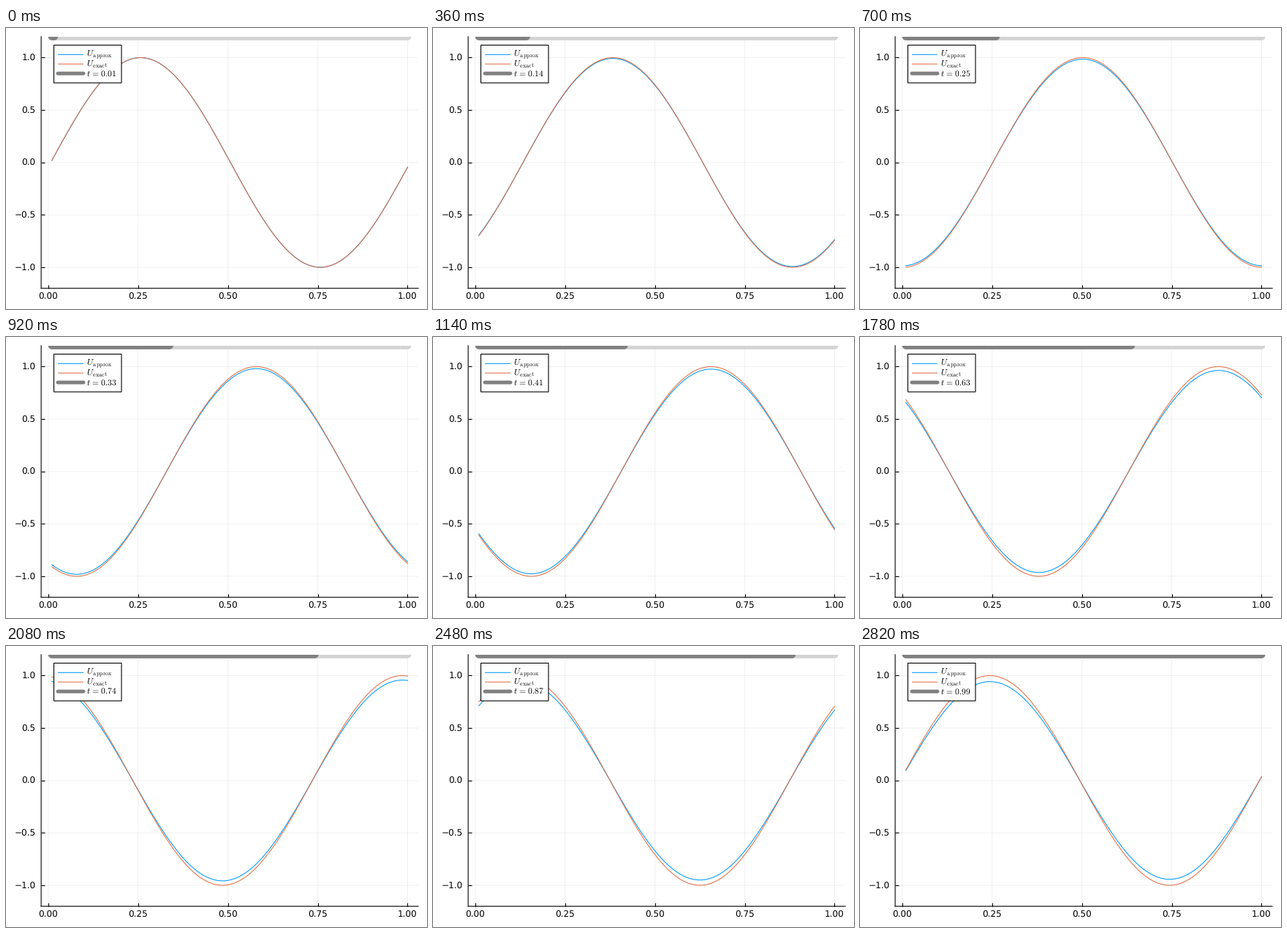
A matplotlib script for the animation above (2840 ms loop, 576x384 px).

```python
import numpy as np
import matplotlib as mpl
import matplotlib.pyplot as plt
from matplotlib.animation import FuncAnimation
from matplotlib.patches import Rectangle

W, H, DPI = 576, 384, 96
PX = 72 / DPI  # points per pixel
STEPS, INTERVAL = 142, 20

BLUE, ORANGE = "#009AFA", "#E26F46"
GRAY, LIGHT = "#808080", "#D3D3D3"

mpl.rcParams.update({
    "font.family": "DejaVu Sans",
    "font.size": 12 * PX,
    "mathtext.fontset": "cm",
    "text.hinting": "none",
    "path.snap": False,
})

# Linear advection on a periodic grid, first-order upwind scheme
dx, cfl = 0.01, 0.7
dt = cfl * dx
x = np.arange(1, 101) * dx
wave = np.exp(2j * np.pi * x)
gain = 1 - cfl + cfl * np.exp(-2j * np.pi * dx)
ticks = np.linspace(x[0], x[-1], STEPS + 1)  # clock and progress bar

LEFT, RIGHT, TOP, BOTTOM = 48.1, 564.1, 11.8, 355.7
fig = plt.figure(figsize=(W / DPI, H / DPI), dpi=DPI, facecolor="white")
ax = fig.add_axes([LEFT / W, 1 - BOTTOM / H,
                   (RIGHT - LEFT) / W, (BOTTOM - TOP) / H])
pad = 0.03 * (x[-1] - x[0])
ax.set(xlim=(x[0] - pad, x[-1] + pad), ylim=(-1.2, 1.2),
       xticks=np.linspace(0, 1, 5), yticks=np.linspace(-1, 1, 5))
ax.xaxis.set_major_formatter("{x:.2f}")
ax.yaxis.set_major_formatter(lambda v, _: f"{v:.1f}".replace("-", "\u2212"))
ax.spines[["top", "right"]].set_visible(False)
for side in ("left", "bottom"):
    ax.spines[side].set_linewidth(1.1 * PX)
ax.tick_params(direction="in", length=5 * PX, width=1.1 * PX)
ax.tick_params(axis="x", pad=6.3 * PX)
ax.tick_params(axis="y", pad=7.5 * PX)
ax.set_axisbelow(True)
ax.grid(color="black", alpha=0.06, linewidth=1 * PX)


def curve(color):
    return ax.plot([], [], color=color, lw=1.05 * PX)[0]


def bar(end, color):
    return ax.plot([x[0], end], [1.2, 1.2], color=color, lw=10 * PX,
                   solid_capstyle="round")[0]


approx, exact = curve(BLUE), curve(ORANGE)
bar(x[-1], LIGHT)
progress = bar(x[0], GRAY)

# Legend, laid out in pixels from the top left corner
ui = fig.add_axes([0, 0, 1, 1])
ui.set(xlim=(0, W), ylim=(H, 0))
ui.axis("off")
ui.add_patch(Rectangle((65.5, 23.4), 92.5, 51.6, fc="white", ec="black",
                       lw=1.1 * PX))


def entry(y, color, width, text):
    ui.plot([71, 106], [y, y], color=color, lw=width * PX,
            solid_capstyle="round" if width > 2 else "butt")
    return ui.text(110.3, y, text, va="center", fontsize=11.6 * PX)


entry(36.3, BLUE, 1.05, r"$U_{\hspace{0.15}\mathrm{approx}}$")
entry(49.2, ORANGE, 1.05, r"$U_{\hspace{0.15}\mathrm{exact}}$")
clock = entry(62.1, GRAY, 5, "")


def update(k):
    n = k + 1
    approx.set_data(x, (gain ** n * wave).imag)
    exact.set_data(x, np.sin(2 * np.pi * (x - n * dt)))
    progress.set_data([x[0], ticks[n]], [1.2, 1.2])
    clock.set_text(rf"$t\hspace{{0.1}}=\hspace{{0.1}}{np.round(ticks[k], 2):g}$")
    return approx, exact, progress, clock


anim = FuncAnimation(fig, update, frames=STEPS, interval=INTERVAL,
                     repeat=True, repeat_delay=0)
plt.show()
```
